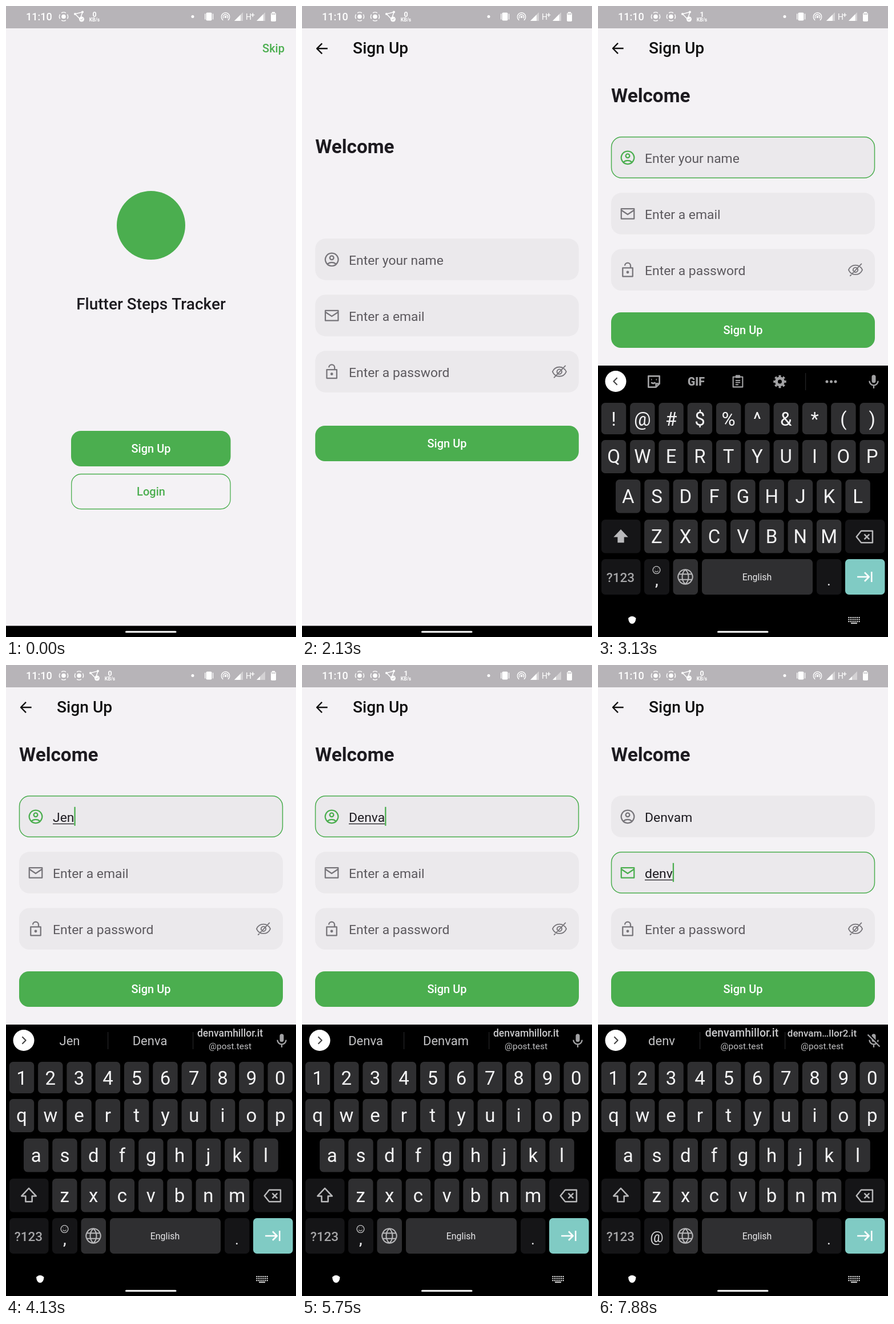
These frames come from a looping animation (508x1102 px, 8 s). An HTML page with a canvas:

```html
<!DOCTYPE html>
<html lang="en">
<head>
<meta charset="utf-8">
<title>Steps tracker sign-up</title>
<style>
  html, body { margin: 0; width: 100%; height: 100%; overflow: hidden; background: #f4f2f5; }
  canvas { display: block; }
</style>
</head>
<body>
<canvas id="stage" width="508" height="1102"></canvas>
<script>
const ctx = document.getElementById('stage').getContext('2d');
const W = 508, H = 1102, LOOP = 8000, STEP = 125;
const GREEN = '#4bae4f', PAGE = '#f4f2f5', INK = '#1d1b20', HINT = '#5c595e', GREY = '#77757a';
const KEY = '#2f2f31', DARK_KEY = '#151517', TOOL = '#a2a2a4';
const MAIL = 'denvamhillor.it', MAIL_2 = 'denvam…llor2.it', DOMAIN = '@post.test';

// Typed text: [time, value]
const NAME = [[3500, 'J'], [3880, 'Je'], [4130, 'Jen'], [4250, 'Jenv'], [5380, 'Denva'], [5880, 'Denvam']];
const EMAIL = [[7000, 'd'], [7380, 'de'], [7630, 'den'], [7880, 'denv']];
const FOCUS_NAME = 2250, FOCUS_EMAIL = 6500;

const ICONS = {
  back: 'M20 12H5M12 4.5L4.5 12l7.5 7.5',
  account: 'M12 3a9 9 0 1 0 .01 0zM12 6.8a2.7 2.7 0 1 0 .01 0zM6 18.5c3-3.3 9-3.3 12 0',
  mail: 'M3 5h18v14H3zM3 7l9 6 9-6',
  lock: 'M5 9h14v12H5zM16 9V6a4 4 0 0 0-8 0M12 14a1 1 0 1 0 .01 0z',
  eyeOff: 'M2 12c4-9 16-9 20 0c-4 9-16 9-20 0zM12 8.5a3.5 3.5 0 1 0 .01 0zM21 3L4 21',
  left: 'M14.5 6l-6 6 6 6',
  right: 'M9.5 6l6 6-6 6',
  sticker: 'M4 4h16v11l-5 5H4zM15 20v-5h5M8 9h1M15 9h1M8 13q3 3 6 0',
  clipboard: 'M4 4h16v17H4zM9 2h6v3H9zM8 10h8M8 13.5h8M8 17h5',
  palette: 'M12 2a10 10 0 0 0 0 20c3 0 2-2 1.5-3s0-3 2-3h3c6-3 2-14-6.5-14zM6.5 10a1.5 1.5 0 1 0 .01 0zM9.5 6a1.5 1.5 0 1 0 .01 0zM14.5 6a1.5 1.5 0 1 0 .01 0zM17.5 10a1.5 1.5 0 1 0 .01 0z',
  resize: 'M4 3h16v18H4z',
  resizeFill: 'M10 12l3 2V9h3v5l5 1v7h-7z',
  mic: 'M12 2a3 3 0 0 0-3 3v6a3 3 0 0 0 6 0V5a3 3 0 0 0-3-3z',
  micStand: 'M5.5 11a6.5 6.5 0 0 0 13 0M12 17.5V22',
  slash: 'M3 3l18 18',
  shift: 'M12 3.5L3 13h5v7h8v-7h5z',
  erase: 'M8 4.5h14.5v15H8L2 12zM12 8.8l6.4 6.4M18.4 8.8l-6.4 6.4',
  globe: 'M12 2.5a9.5 9.5 0 1 0 .01 0zM12 2.5c-5.5 5-5.5 14 0 19c5.5-5 5.5-14 0-19M3.5 8.5h17M3.5 15.5h17',
  smile: 'M12 3a9 9 0 1 0 .01 0zM8 9h1M15 9h1M7.5 14q4.5 5 9 0',
  next: 'M2 12h15M12 6l6 6-6 6M21.5 5v14'
};

const clamp = v => Math.max(0, Math.min(1, v));
const ramp = (t, start, length) => clamp((t - start) / length);
const easeOut = p => 1 - (1 - p) ** 3;
const latest = (steps, t) => steps.reduce((best, s) => t >= s[0] ? s : best, null);

function text(str, x, y, size, color, align = 'left', weight = 400) {
  ctx.font = `${weight} ${size}px Roboto, sans-serif`;
  ctx.textAlign = align;
  ctx.fillStyle = color;
  ctx.fillText(str, x, y);
}

function box(x, y, w, h, r, fill, stroke, line = 1.5) {
  ctx.beginPath();
  ctx.roundRect(x, y, w, h, r);
  if (fill) { ctx.fillStyle = fill; ctx.fill(); }
  if (stroke) { ctx.strokeStyle = stroke; ctx.lineWidth = line; ctx.stroke(); }
}

function disc(x, y, r, color) {
  ctx.beginPath();
  ctx.arc(x, y, r, 0, 7);
  ctx.fillStyle = color;
  ctx.fill();
}

function arc(x, y, r, from, to, color, line) {
  ctx.beginPath();
  ctx.arc(x, y, r, from, to);
  ctx.strokeStyle = color;
  ctx.lineWidth = line;
  ctx.stroke();
}

function poly(points, fill, stroke) {
  ctx.beginPath();
  points.forEach(p => ctx.lineTo(...p));
  ctx.closePath();
  if (fill) { ctx.fillStyle = fill; ctx.fill(); }
  if (stroke) { ctx.strokeStyle = stroke; ctx.lineWidth = 1.5; ctx.stroke(); }
}

// Icons live on a 24-unit grid centred on (x, y).
function icon(name, x, y, size, color, { line = 2, fill = false } = {}) {
  ctx.save();
  ctx.translate(x - size / 2, y - size / 2);
  ctx.scale(size / 24, size / 24);
  ctx.lineWidth = line;
  ctx.lineJoin = 'round';
  ctx.strokeStyle = ctx.fillStyle = color;
  const path = new Path2D(ICONS[name]);
  fill ? ctx.fill(path, 'evenodd') : ctx.stroke(path);
  ctx.restore();
}

function gear(x, y) {
  arc(x, y, 6, 0, 7, TOOL, 5);
  for (let i = 0; i < 8; i++) {
    const a = i * Math.PI / 4;
    arc(x, y, 9.5, a - .2, a + .2, TOOL, 3.5);
  }
}

function microphone(x, y, off) {
  icon('mic', x, y, 28, TOOL, { fill: true });
  icon('micStand', x, y, 28, TOOL);
  if (off) {
    icon('slash', x + 1, y - 1, 28, '#000', { line: 3 });
    icon('slash', x, y, 28, TOOL);
  }
}

function statusBar(t) {
  const white = '#fff';
  ctx.fillStyle = '#b7b4b8';
  ctx.fillRect(0, 0, W, 39);
  text('11:10', 35, 25, 18, white, 'left', 500);
  const recorders = t < 250 ? 1 : 2;
  for (let i = 0; i < recorders; i++) {
    const x = 101 + 27 * i;
    disc(x, 18.5, 3.8, white);
    for (let q = 0; q < 4; q++) arc(x, 18.5, 7.5, q * Math.PI / 2 - .55, q * Math.PI / 2 + .55, white, 1.4);
  }
  const x = 101 + 27 * recorders;
  poly([[x - 7, 14], [x + 6, 10.5], [x + 2, 23]], null, white);
  disc(x - 7, 14, 2, white);
  disc(x + 6, 10.5, 2, white);
  disc(x + 4.5, 23, 4.5, white);
  ctx.beginPath();
  ctx.moveTo(x + 2.5, 23); ctx.lineTo(x + 4, 24.5); ctx.lineTo(x + 7, 21.5);
  ctx.strokeStyle = '#b7b4b8'; ctx.lineWidth = 1; ctx.stroke();
  const rate = (t >= 2630 && t < 3500) || (t >= 4750 && t < 5880) ? '1' : '0';
  text(rate, x + 27, 19, 12.5, white, 'center', 700);
  text('KB/s', x + 27, 27, 8.5, white, 'center', 700);

  disc(327, 18.5, 2.5, white);
  box(350.5, 11.5, 10, 14, 2, white);
  ctx.fillRect(348, 13.5, 1.2, 10);
  ctx.fillRect(362, 13.5, 1.2, 10);
  disc(384.5, 19, 2, white);
  arc(384.5, 19, 4.2, 2.5, 6.92, white, 1.4);
  arc(384.5, 19, 7.2, 2.2, 7.22, white, 1.4);
  const weak = (t >= 3630 && t < 6380) || t >= 7000;
  for (const [sx, level] of [[400, .72], [439, weak ? .4 : .78]]) {
    poly([[sx, 26], [sx + 15, 26], [sx + 15, 11]], 'rgba(255,255,255,.4)');
    const w = 15 * level;
    poly([[sx, 26], [sx + w, 26], [sx + w, 26 - w]], white);
  }
  text('H', 420, 24, 14, white);
  text('+', 429, 20, 12, white, 'left', 500);
  box(464, 12, 9, 15, 1.8, white);
  ctx.fillRect(466, 10.5, 5, 2);
  ctx.fillStyle = 'rgba(160,157,161,.5)';
  ctx.fillRect(465, 13, 7, 2);
}

function welcomePage(t) {
  ctx.fillStyle = PAGE;
  ctx.fillRect(0, 0, W, H);
  text('Skip', 488, 80.5, 20, GREEN, 'right', 500);
  disc(254, 383, 60, GREEN);
  text('Flutter Steps Tracker', 254, 530, 28, INK, 'center', 500);
  box(114, 742, 279.5, 62, 17, GREEN);
  if (t >= 1630) {
    ctx.save();
    ctx.clip();
    ctx.fillStyle = `rgba(255,255,255,${.05 + .04 * ramp(t, 1630, 150)})`;
    ctx.fillRect(114, 742, 280, 62);
    disc(350, 767, 5 + 300 * ramp(t, 1630, 450), 'rgba(255,255,255,.1)');
    ctx.restore();
  }
  text('Sign Up', 254, 780, 20, '#fff', 'center', 500);
  box(114.7, 817.5, 278.3, 61, 17, null, GREEN, 1.3);
  text('Login', 254, 855, 20, GREEN, 'center', 500);
}

function field(y, { symbol, hint, value = '', focus = 0, composing, caret }) {
  box(23, y, 462, 72.5, 18, '#ebe9ec');
  if (focus > 0) box(23.5, y + .5, 461, 71.5, 18, null, `rgba(75,174,79,${focus})`);
  const mid = y + 36.5;
  icon(symbol, 52, mid, 30, focus > .5 ? GREEN : GREY, { line: 1.8 });
  text(value || hint, 82, mid + 9.3, 22.9, value ? INK : HINT);
  const width = value ? ctx.measureText(value).width : 0;
  if (value && composing) ctx.fillRect(82, mid + 12, width, 1.3);
  if (caret) {
    ctx.fillStyle = GREEN;
    ctx.fillRect(82 + width, mid - (value ? 17 : 15), 2.3, value ? 33 : 29);
  }
}

function signUpPage(t, state) {
  const slack = state.drop / 89;
  ctx.fillStyle = PAGE;
  ctx.fillRect(0, 0, W, H);
  icon('back', 35, 74, 29, '#111');
  text('Sign Up', 89, 83, 28.2, '#111', 'left', 500);
  text('Welcome', 23, 168.3 + 16.7 * slack, 33.3, INK, 'left', 700);

  const top = 228.3 + 33.4 * slack;
  const emailFocus = ramp(t, FOCUS_EMAIL, 100);
  const nameFocus = ramp(t, FOCUS_NAME, 100) * (1 - ramp(t, FOCUS_EMAIL, 160));
  field(top, { symbol: 'account', hint: 'Enter your name', value: state.name, focus: nameFocus,
    composing: t < 6380, caret: state.caret && !state.onEmail });
  field(top + 98, { symbol: 'mail', hint: 'Enter a email', value: state.email, focus: emailFocus,
    composing: true, caret: state.caret && state.onEmail });
  field(top + 196.2, { symbol: 'lock', hint: 'Enter a password' });
  icon('eyeOff', 451, top + 232.5, 29, GREY, { line: 1.5 });

  const button = 535 + 37.2 * slack;
  box(23, button, 462, 62, 17, GREEN);
  text('Sign Up', 254, button + 38, 20, '#fff', 'center', 500);
}

function suggestions(state) {
  const word = state.onEmail ? state.email : state.name;
  const address = (name, x, size) => {
    text(name, x, 21, size, '#c8c8ca', 'center', 500);
    text(DOMAIN, x, 43, 15.5, '#c0c0c2', 'center');
  };
  text(word, 111.5, 36, 22, '#c4c4c6', 'center');
  ctx.fillStyle = '#252527';
  ctx.fillRect(178, 13, 1.2, 30);
  ctx.fillRect(327, 13, 1.2, 30);
  if (state.onEmail) {
    address(MAIL, 252, 19.5);
    address(MAIL_2, 392.5, 17);
  } else {
    text(word.startsWith('Denva') ? 'Denvam' : 'Denva', 252, 36, 22, '#c4c4c6', 'center');
    address(MAIL, 392.5, 17.5);
  }
}

function toolbar(onEmail) {
  const y = 28;
  if (onEmail) {
    icon('clipboard', 98, y, 25, TOOL);
    gear(172, y);
    icon('palette', 245, y, 26, TOOL, { fill: true });
    icon('resize', 318, y, 25, TOOL);
    icon('resizeFill', 318, y, 25, TOOL, { fill: true });
  } else {
    icon('sticker', 98, y, 29, TOOL, { line: 2.2 });
    text('GIF', 172, y + 7, 19.5, TOOL, 'center', 900);
    icon('clipboard', 245, y, 25, TOOL);
    gear(318.5, y);
  }
  ctx.fillStyle = '#252527';
  ctx.fillRect(363, 13, 1.2, 30);
  for (const x of [401, 408.5, 416]) disc(x, y, 2.5, TOOL);
}

function keyboard(t, state) {
  const upper = t >= 3130 && t < 3630;
  const typing = state.onEmail ? state.email : state.name;
  const grey = '#b9b9bb';
  ctx.save();
  ctx.translate(0, 628 + state.drop);
  ctx.fillStyle = '#000';
  ctx.fillRect(0, 0, W, 480);

  if (typing) suggestions(state); else toolbar(state.onEmail);
  disc(31, 27.5, 18.5, '#fff');
  icon(typing ? 'right' : 'left', 31, 27.5, 25, '#444');
  microphone(483, 28, state.onEmail);

  const rows = [
    [upper ? '!@#$%^&*()' : '1234567890', 27.5, 65, 55, 105],
    ['qwertyuiop', 27.5, 130, 58, 170],
    ['asdfghjkl', 52.7, 199, 58.5, 239.5],
    ['zxcvbnm', 102.8, 269, 58.5, 309.5]
  ];
  for (const [keys, x0, y, h, base] of rows) {
    [...keys].forEach((key, i) => {
      const x = x0 + 50.3 * i;
      box(x - 21.7, y, 43.4, h, 6.5, KEY);
      text(upper ? key.toUpperCase() : key, x, base, 33, '#f4f4f5', 'center');
    });
  }

  box(6, 269, 68.5, 58.5, 6.5, DARK_KEY);
  icon('shift', 40, 298, 34, grey, { fill: upper, line: 1.8 });
  box(433, 269, 69.5, 58.5, 6.5, DARK_KEY);
  icon('erase', 466.5, 299, 33, grey, { line: 1.8 });

  box(6, 338, 68.5, 62, 6.5, DARK_KEY);
  text('?123', 39.5, 377.5, 22.5, '#a6a6a8', 'center', 500);
  box(81, 338, 44, 62, 6.5, DARK_KEY);
  if (state.onEmail) text('@', 102.8, 380, 26, '#d8d8da', 'center');
  else {
    icon('smile', 102.5, 357, 17, grey, { line: 1.8 });
    text(',', 102.8, 384, 26, '#e6e6e8', 'center', 500);
  }
  box(131.5, 338, 43.5, 62, 6.5, KEY);
  icon('globe', 153, 369, 32, grey, { line: 1.5 });
  box(182, 338, 194, 62, 6.5, KEY);
  text('English', 278.5, 375, 15.9, '#e8e8ea', 'center');
  box(383, 338, 43.5, 62, 6.5, DARK_KEY);
  text('.', 404.5, 384, 26, '#e6e6e8', 'center');
  box(433, 338, 69.5, 62, 6.5, '#80cbc4');
  icon('next', 467, 369, 31, '#fff');
  ctx.restore();
}

function navigationBar(withIcons) {
  ctx.fillStyle = '#fff';
  if (withIcons) {
    ctx.beginPath();
    ctx.moveTo(53, 1069);
    ctx.quadraticCurveTo(59.5, 1062.5, 66.5, 1069);
    ctx.quadraticCurveTo(66, 1078.5, 59.7, 1079);
    ctx.quadraticCurveTo(53.5, 1078.5, 53, 1069);
    ctx.fill();
    for (let row = 0; row < 3; row++)
      for (let i = 0; i < 6; i++) ctx.fillRect(438.5 + 3.6 * i, 1067 + 3.5 * row, 2, 2);
    ctx.fillRect(443, 1077, 11, 1.6);
  }
  box(209, 1091.5, 89.5, 3, 1.5, '#fff');
}

function scaled(scale, alpha, draw) {
  ctx.save();
  ctx.globalAlpha = alpha;
  ctx.translate(W / 2, H / 2);
  ctx.scale(scale, scale);
  ctx.translate(-W / 2, -H / 2);
  draw();
  ctx.restore();
}

function render(t) {
  const onEmail = t >= FOCUS_EMAIL;
  const name = latest(NAME, t), email = latest(EMAIL, t);
  const lastInput = onEmail ? (email ? email[0] : FOCUS_EMAIL) : (name ? name[0] : FOCUS_NAME);
  const state = {
    onEmail,
    name: name ? name[1] : '',
    email: email ? email[1] : '',
    caret: t >= FOCUS_NAME && (t - lastInput) % 1000 < 500,
    drop: 474 * (1 - easeOut(ramp(t, 2372, 300)))
  };
  const open = easeOut(ramp(t, 1880, 300));
  if (open < 1) scaled(1 + .05 * open, 1, () => welcomePage(t));
  if (open > 0) scaled(.85 + .15 * open, clamp(open * 1.3), () => signUpPage(t, state));
  ctx.fillStyle = '#000';
  ctx.fillRect(0, 1082.5, W, 20);
  if (t > 2372) keyboard(t, state);
  statusBar(t);
  navigationBar(t > 2372);
}

const stepped = t => Math.round(Math.floor(t / STEP) * STEP / 10) * 10;

const start = performance.now();
function tick() {
  render(stepped((performance.now() - start) % LOOP));
  requestAnimationFrame(tick);
}
tick();
</script>
</body>
</html>
```
